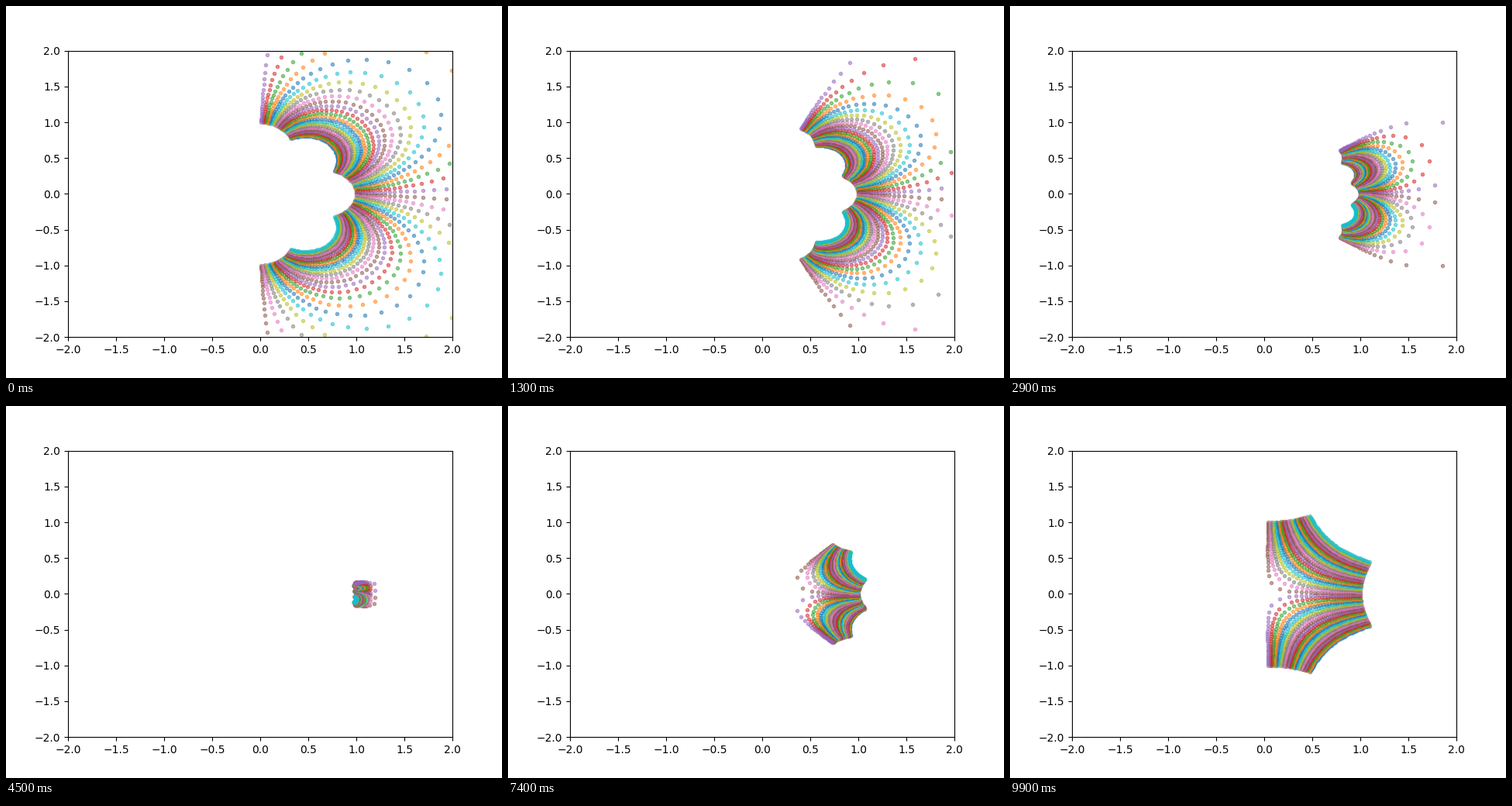
Recreate the animation shown at these times as a matplotlib script. Size 640x480 px, loop 10 s.

```python
import numpy as np
import matplotlib.pyplot as plt
from matplotlib.animation import FuncAnimation

SIDE = 50      # points along each side of the complex grid
FRAMES = 100

# Square grid on [-1, 1] x [-1, 1]; each row has a constant imaginary part.
axis = np.linspace(-1, 1, SIDE)
x, y = np.meshgrid(axis, axis)
grid = x + 1j * y

fig, ax = plt.subplots(figsize=(6.4, 4.8), dpi=100)
ax.set_xlim(-2, 2)
ax.set_ylim(-2, 2)
rows = [ax.plot([], [], ".", color=f"C{i % 10}", alpha=0.5)[0]
        for i in range(SIDE)]


def update(frame):
    """Raise the grid to a power that runs from -0.5 up to 0.49."""
    power = (frame - FRAMES // 2) / FRAMES
    for row, w in zip(rows, grid ** power):
        row.set_data(w.real, w.imag)
    return rows


anim = FuncAnimation(fig, update, frames=FRAMES, interval=100,
                     repeat=True, repeat_delay=0)
plt.show()
```
